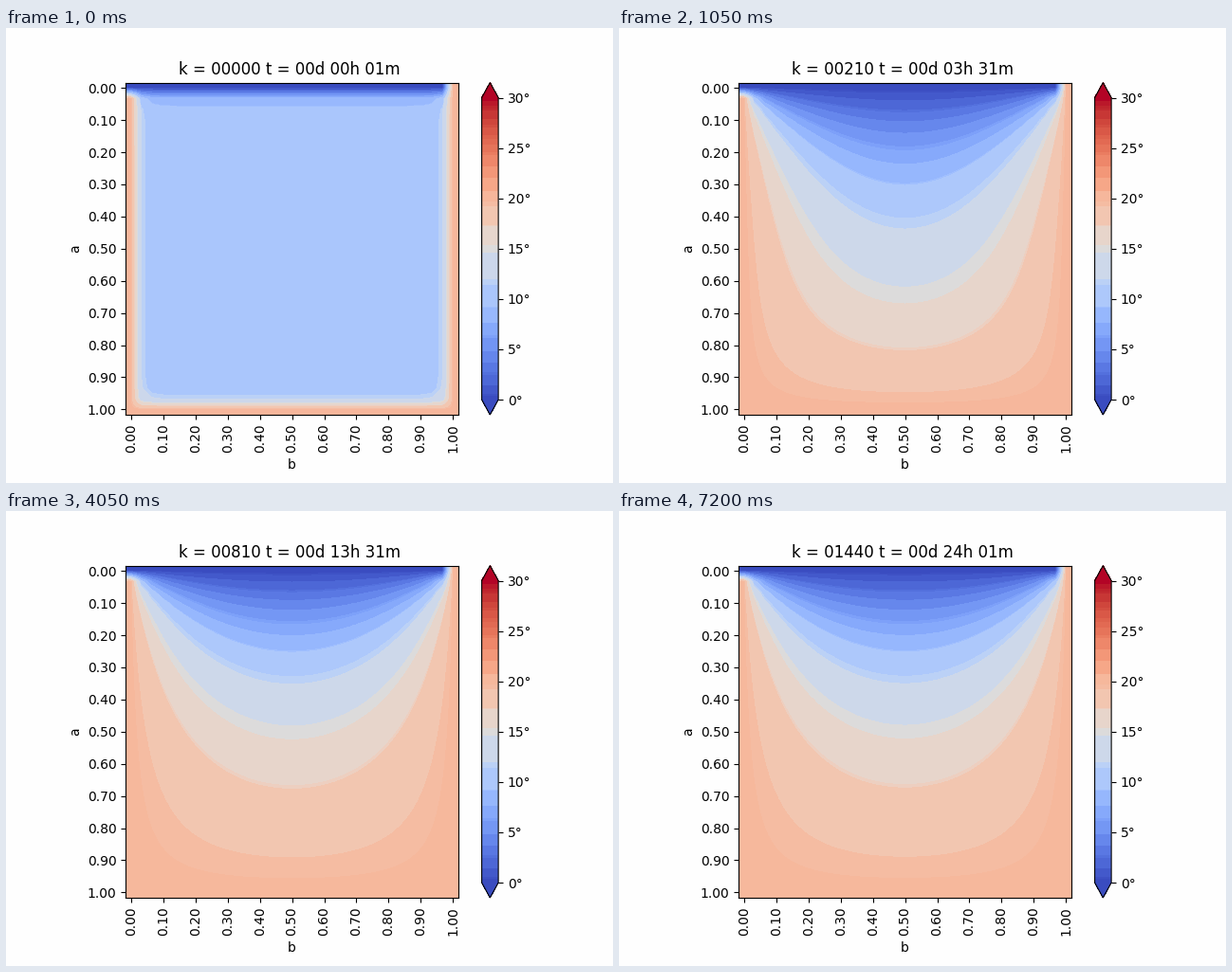
Recreate the animation shown at these times as a matplotlib script. Size 640 by 480 pixels, loop 7.35 s.

```python
import matplotlib
import matplotlib.pyplot as plt
import numpy as np
from matplotlib.animation import FuncAnimation
from matplotlib.colors import ListedColormap

N = 31              # grid points per side
FO = 0.297          # Fourier number of one implicit one-minute step
T_MAX = 30
FRAMES, INTERVAL, STRIDE = 49, 150, 30

# Plate: cold top edge, the other three edges warm
plate = np.full((N, N), 20.0)
plate[0, :-1] = 0

# Eigenmodes of the 1D Laplacian on the inner points
n = N - 2
lap = 2 * np.eye(n) - np.eye(n, k=1) - np.eye(n, k=-1)
lam, Q = np.linalg.eigh(lap)
rates = lam[:, None] + lam[None, :]

edges = np.zeros((n, n))
edges[0] += plate[0, 1:-1]
edges[-1] += plate[-1, 1:-1]
edges[:, 0] += plate[1:-1, 0]
edges[:, -1] += plate[1:-1, -1]
steady = Q @ ((Q.T @ edges @ Q) / rates) @ Q.T
modes = Q.T @ (10 - steady) @ Q


def field(steps):
    """Temperature after a number of backward Euler steps."""
    u = plate.copy()
    u[1:-1, 1:-1] = steady + Q @ (modes / (1 + FO * rates) ** steps) @ Q.T
    return u


# Colours that share a coarse RGB cell merge into one band
lut = matplotlib.colormaps["coolwarm"](np.arange(256), bytes=True)[:, :3].astype(int)
cells = (lut // [32, 16, 32]) @ [256, 16, 1]
band = np.unique(cells, return_inverse=True)[1].ravel()

# Bilinear weights from the grid to screen pixels
pos = np.clip((np.arange(350) + 0.5) * N / 350 - 0.5, 0, N - 1)
W = np.clip(1 - np.abs(pos[:, None] - np.arange(N)), 0, 1)

bar_area = np.full(256, 20.0)
bar_area[[0, -1]] += 127


def banded_cmap(u):
    """Give each band the mean of the colours visible in it."""
    idx = np.clip((W @ u @ W.T) / T_MAX * 256, 0, 255).astype(int)
    count = np.bincount(idx.ravel(), minlength=256) + bar_area
    total = np.bincount(band, count)
    mean = [np.bincount(band, count * lut[:, c]) / total for c in range(3)]
    rgb = np.floor(np.stack(mean, axis=1) + 1e-6)
    return ListedColormap(rgb[band] / 255)


plt.rcParams["font.family"] = "DejaVu Sans"
fig, ax = plt.subplots(figsize=(6.4, 4.8), dpi=100, facecolor="#fefefe")
fig.subplots_adjust(left=0.125, right=0.9, top=0.88, bottom=0.15)

start = field(1)
im = ax.imshow(start, cmap=banded_cmap(start), vmin=0, vmax=T_MAX,
               interpolation="bilinear")
fig.colorbar(im, ax=ax, extend="both", ticks=range(0, T_MAX + 1, 5), format="%d°")

ticks = np.arange(0, N, 3)
labels = [f"{i / (N - 1):.2f}" for i in ticks]
ax.set_xticks(ticks, labels, rotation=90)
ax.set_yticks(ticks, labels)
ax.set_xlabel("b")
ax.set_ylabel("a")
title = ax.set_title("")


def update(i):
    k = i * STRIDE
    u = field(k + 1)
    im.set_data(u)
    im.set_cmap(banded_cmap(u))
    h, m = divmod(k + 1, 60)
    title.set_text(f"k = {k:05d} t = 00d {h:02d}h {m:02d}m ")
    return im, title


anim = FuncAnimation(fig, update, frames=FRAMES, interval=INTERVAL,
                     repeat=True, repeat_delay=0, blit=False)
plt.show()
```
